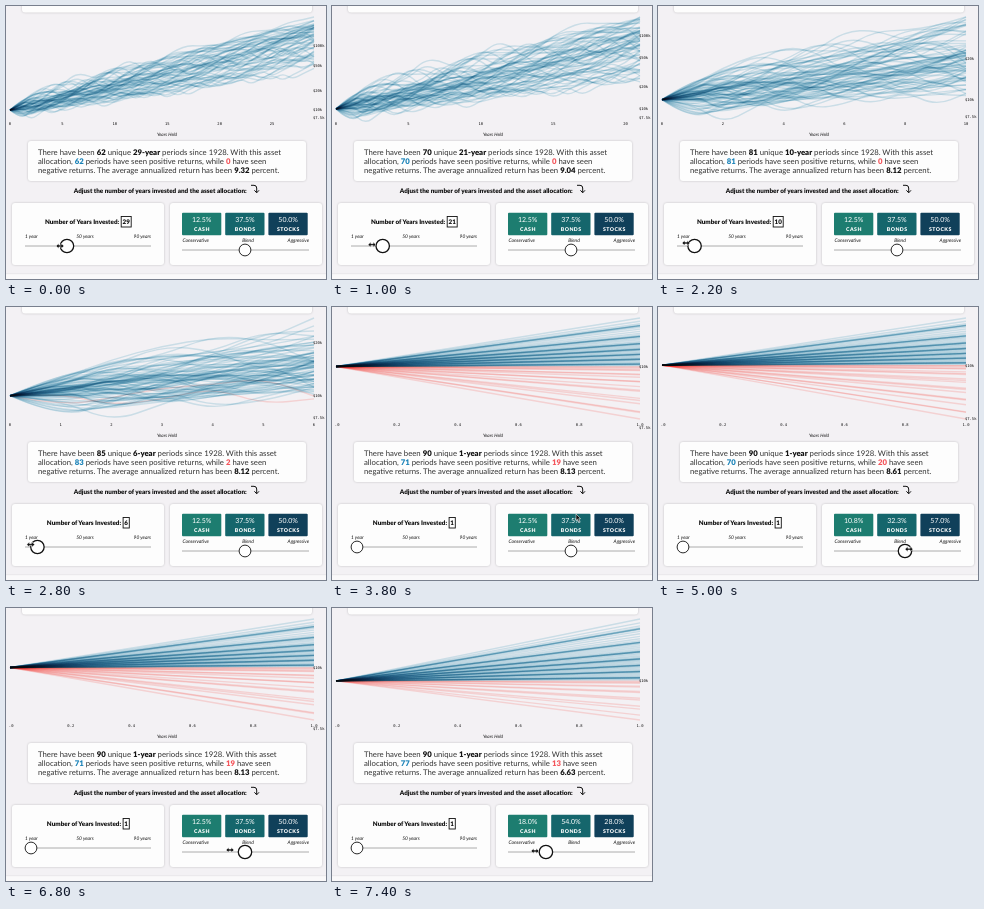
Animation, 320 px wide and 273 px high, one loop 7600 ms. Source, as an HTML page:

```html
<!DOCTYPE html>
<html lang="en">
<head>
<meta charset="utf-8">
<title>Investment returns by holding period</title>
<style>
  html, body { margin: 0; width: 100%; height: 100%; overflow: hidden; background: #f3f1f4; }
  svg { display: block; width: 100vw; height: 100vh; }
  text { font-family: Lato, sans-serif; fill: #111; white-space: pre; text-rendering: geometricPrecision; }
  .mid { text-anchor: middle; }
  .end { text-anchor: end; }
  .axis text { font: 3.8px "DejaVu Sans Mono", monospace; }
  .held { font-size: 4.6px; font-style: italic; }
  .body { font-size: 7.78px; fill: #333; }
  .body tspan { font-weight: 900; fill: #111; }
  .body .up { fill: #1982b8; }
  .body .down { fill: #f4545a; }
  .prompt { font-size: 6.35px; font-weight: 900; }
  .title { font-size: 6.3px; font-weight: 900; }
  .hint { font-size: 4.9px; font-style: italic; }
  .share { font-size: 7px; fill: #fff; text-anchor: middle; }
  .asset { font-size: 5.2px; font-weight: 900; fill: #fff; letter-spacing: .45px; text-anchor: middle; }
  .card { fill: #fdfdfd; filter: drop-shadow(.6px .8px 1.3px #0003); }
  .track { stroke: #999; stroke-width: .8; }
  .handle { fill: #fff; stroke: #111; }
  #lines path { fill: none; stroke-width: 1.4; mix-blend-mode: multiply; }
</style>
</head>
<body>
<svg viewBox="0 0 320 273" preserveAspectRatio="none">
  <rect width="320" height="273" fill="#f3f1f4"/>
  <rect y="268" width="320" height="5" fill="#faf9fa"/>
  <path d="M0 267.7H320" stroke="#e2e0e3" stroke-width=".6"/>
  <rect class="card" x="16" y="-10" width="290" height="16.5" rx="3"/>
  <g id="lines"></g>
  <g id="axes" class="axis"></g>
  <text class="held mid" x="161" y="129.5">Years Held</text>

  <rect class="card" x="22" y="135" width="278" height="40" rx="3"/>
  <g id="summary"></g>

  <text class="prompt" x="67.7" y="187.3">Adjust the number of years invested and the asset allocation:</text>
  <path d="M245 179.3h3q2.7 0 2.7 2.7v4.5m-2.3-2.2l2.3 2.5 2.3-2.5" fill="none" stroke="#111"/>

  <rect class="card" x="6" y="197" width="152" height="62" rx="3"/>
  <text class="title end" id="yearsTitle" y="218">Number of Years Invested:</text>
  <rect id="yearsBox" y="210.5" height="10.5" fill="none" stroke="#111" stroke-width=".9"/>
  <text class="title mid" id="yearsValue" x="120.2" y="218">29</text>
  <text class="hint" x="19" y="232">1 year</text>
  <text class="hint mid" x="79" y="232">50 years</text>
  <text class="hint end" x="145" y="232">90 years</text>
  <path class="track" d="M19 240H145"/>
  <circle class="handle" id="yearsHandle" cy="240"/>

  <rect class="card" x="164" y="197" width="152" height="62" rx="3"/>
  <g id="assets"></g>
  <text class="hint" x="176.5" y="235.7">Conservative</text>
  <text class="hint mid" x="242" y="235.7">Blend</text>
  <text class="hint end" x="303" y="235.7">Aggressive</text>
  <path class="track" d="M176 244H303"/>
  <circle class="handle" id="stocksHandle" cy="244"/>
  <path id="cursor" fill="#111" stroke="#fff" stroke-width=".5"/>
</svg>
<script>
const LOOP = 7600, STEP = 200, MARKET_YEARS = 90;
const LEFT = 4, RIGHT = 308, TOP = 11, BOTTOM = 112;
const $ = id => document.getElementById(id);

// Piecewise linear interpolation through [position, value] points.
function along(points, x) {
  if (x <= points[0][0]) return points[0][1];
  for (let i = 1; i < points.length; i++) {
    const [x0, y0] = points[i - 1], [x1, y1] = points[i];
    if (x <= x1) return y0 + (y1 - y0) * (x - x0) / (x1 - x0);
  }
  return points[points.length - 1][1];
}

// Motion over time
const yearsAt = [[0, 29], [1000, 21], [2200, 10], [3400, 1]];
const stocksAt = [[4800, 50], [5800, 84], [6050, 92], [6800, 50], [7400, 28]];
const cursorX = [[0, 54], [1000, 40], [2200, 28], [3300, 22], [3800, 244], [4200, 243], [4800, 241],
                 [5800, 291], [6050, 297], [6800, 224], [7400, 203]];
const cursorY = [[0, 240], [2200, 237], [3300, 238], [3800, 207], [4400, 243], [4800, 243],
                 [5800, 239], [6800, 242], [7400, 243]];

// One-year results by stock share; growth is log10 of the multiple
const lossYears = [[28, 13], [50, 19], [84, 24], [100, 26]];
const bestYear = [[28, .079], [50, .1], [84, .153], [100, .178]];
const worstYear = [[28, -.05], [50, -.108], [84, -.198], [100, -.24]];
const yearAverage = [[28, 6.63], [50, 8.13], [84, 10.44], [100, 11.4]];

// Results by holding period for the blended allocation
const best = [[1, .1], [2, .19], [5, .4], [10, .607], [21, 1.258], [29, 1.453]];
const worst = [[1, -.108], [2, -.1], [5, -.03], [10, .03], [21, .37], [29, .65]];
const floor = [[1, -.108], [2, -.13], [10, -.135], [21, -.125]];
const average = [[1, 8.13], [10, 8.12], [21, 9.04], [29, 9.32]];

// Seeded shuffle decides which calendar year gets which rank
let seed = 7;
const random = () => (seed = (seed * 16807) % 2147483647) / 2147483647;
const ranks = Array.from({ length: MARKET_YEARS }, (_, i) => i);
for (let i = MARKET_YEARS - 1; i > 0; i--) {
  const j = Math.floor(random() * (i + 1));
  [ranks[i], ranks[j]] = [ranks[j], ranks[i]];
}

// Uneven spacing gathers neighbouring results into clusters.
const clustered = p => p + .025 * Math.sin(14 * Math.PI * p);

function yearlyGrowth(stocks) {
  const losses = Math.round(along(lossYears, stocks));
  const high = along(bestYear, stocks), low = along(worstYear, stocks);
  return ranks.map(r => {
    if (r < losses) return low * clustered((losses - r) / losses) ** 1.8;
    const p = clustered((r - losses + 1) / (MARKET_YEARS - losses));
    return high * (.7 * p + .3 * p ** 6);
  });
}

// Every rolling window, fitted to the known range of outcomes.
function rollingPaths(years, stocks, low, high) {
  const growth = yearlyGrowth(stocks);
  const paths = [];
  for (let start = 0; start + years <= MARKET_YEARS; start++) {
    const path = [0];
    for (let k = 0; k < years; k++) path.push(path[k] + growth[start + k]);
    paths.push(path);
  }
  const finals = paths.map(p => p[years]);
  const min = Math.min(...finals), max = Math.max(...finals);
  const gain = (high - low) / (max - min), drift = (low - gain * min) / years;
  return paths.map(p => p.map((v, k) => gain * v + drift * k));
}

function smooth(points) {
  const last = points[points.length - 1];
  let d = `M${points[0]}`;
  for (let i = 1; i < points.length - 1; i++) {
    const [x, y] = points[i], [nx, ny] = points[i + 1];
    d += `Q${x} ${y} ${(x + nx) / 2} ${(y + ny) / 2}`;
  }
  return `${d}L${last}`;
}

function tickStep(span) {
  const raw = span / 5, power = 10 ** Math.floor(Math.log10(raw) + 1e-9), ratio = raw / power;
  return power * (ratio >= 7.07 ? 10 : ratio >= 3.16 ? 5 : ratio >= 1.41 ? 2 : 1);
}

const label = (x, y, text, cls = '') => `<text class="${cls}" x="${x}" y="${y}">${text}</text>`;

function drawChart(years, stocks) {
  const single = years === 1;
  const high = single ? along(bestYear, stocks) : along(best, years);
  const low = single ? along(worstYear, stocks) : along(worst, years);
  const base = single ? low : along(floor, years);
  const x = year => LEFT + (RIGHT - LEFT) * year / years;
  const y = v => BOTTOM - (BOTTOM - TOP) * (v - base) / (high - base);

  const paths = rollingPaths(years, stocks, low, high);
  $('lines').innerHTML = paths.map(p => {
    const color = p[years] < 0 ? '#ff4a40' : '#1189b2';
    const d = smooth(p.map((v, k) => [x(k).toFixed(2), y(v).toFixed(2)].map(Number)));
    return `<path d="${d}" stroke="${color}" stroke-opacity=".18"/>`;
  }).join('');

  let axes = '';
  const step = tickStep(years);
  for (let i = 0; i * step <= years + 1e-6; i++) {
    const text = (i * step).toFixed(step < 1 ? 1 : 0);
    axes += label(x(i * step), 119.3, text === '0.0' ? '\u00a0.0' : text, 'mid');
  }
  for (const value of [7.5, 10, 20, 50, 100]) {
    const ty = y(Math.log10(value / 10));
    if (ty > TOP && ty < 125) axes += label(307, ty + 1.4, `$${value}k`);
  }
  $('axes').innerHTML = axes;
  return paths.filter(p => p[years] < 0).length;
}

function drawSummary(years, stocks, losses) {
  const total = MARKET_YEARS + 1 - years;
  const rate = years === 1 ? along(yearAverage, stocks) : along(average, years);
  const b = (text, cls = '') => `<tspan class="${cls}">${text}</tspan>`;
  $('summary').innerHTML = [
    `There have been ${b(total)} unique ${b(years + '-year')} periods since 1928. With this asset`,
    `allocation, ${b(total - losses, 'up')} periods have seen positive returns, while ${b(losses, 'down')} have seen`,
    `negative returns. The average annualized return has been ${b(rate.toFixed(2))} percent.`
  ].map((line, i) => label(32, 148.9 + i * 8.8, line, 'body')).join('');
}

function setHandle(id, x, active) {
  const handle = $(id);
  handle.setAttribute('cx', x);
  handle.setAttribute('r', active ? 6.7 : 5.9);
  handle.setAttribute('stroke-width', active ? 1.3 : .9);
}

function drawControls(years, stocks, t) {
  const boxWidth = years > 9 ? 10 : 6.2;
  $('yearsTitle').setAttribute('x', 118.2 - boxWidth / 2);
  $('yearsBox').setAttribute('x', 120.2 - boxWidth / 2);
  $('yearsBox').setAttribute('width', boxWidth);
  $('yearsValue').textContent = years;
  setHandle('yearsHandle', 25 + (years - 1) * 1.285, t < 3400);
  setHandle('stocksHandle', 239 + (stocks - 50) * 1.14, t >= 4800);

  const rest = 100 - stocks;
  $('assets').innerHTML = [
    ['CASH', rest / 4, '#1d7d70'], ['BONDS', rest * .75, '#15666c'], ['STOCKS', stocks, '#10405a']
  ].map(([name, share, color], i) => {
    const x = 176 + i * 43.2;
    return `<rect x="${x}" y="206.7" width="39.3" height="22.6" rx="1" fill="${color}"/>` +
      label(x + 19.7, 215.8, share.toFixed(1) + '%', 'share') + label(x + 20, 225.2, name, 'asset');
  }).join('');

  const dragging = t < 3400 || t > 4200;
  $('cursor').setAttribute('d', dragging
    ? 'M-4 0l2.8-2.6v1.7h2.4v-1.7L4 0 1.2 2.6V.9h-2.4v1.7z'
    : 'M0 0v6.6l1.5-1.4 1.2 2.5 1.2-.6-1.2-2.4h2z');
  $('cursor').setAttribute('transform', `translate(${along(cursorX, t)} ${along(cursorY, t)})`);
}

let shown = -1;
function frame(now) {
  const t = Math.floor((now % LOOP) / STEP) * STEP;
  if (t !== shown) {
    shown = t;
    const years = Math.round(along(yearsAt, t));
    const stocks = Math.round(along(stocksAt, t));
    drawSummary(years, stocks, drawChart(years, stocks));
    drawControls(years, stocks, t);
  }
  requestAnimationFrame(frame);
}
frame(performance.now());
</script>
</body>
</html>
```
